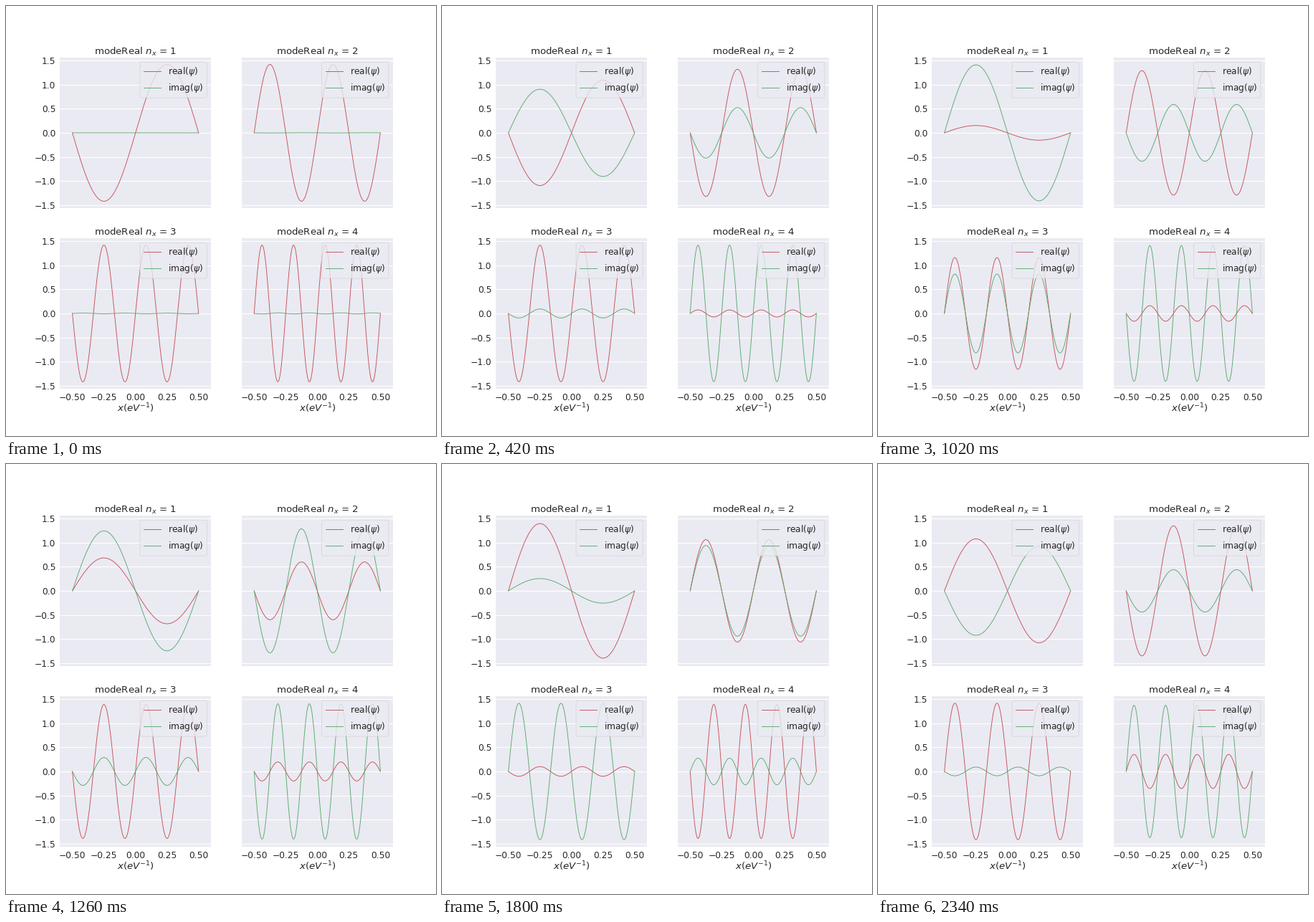
Recreate the animation shown at these times as a matplotlib script. Size 600x600 px, loop 2.37 s.

```python
import matplotlib.pyplot as plt
import numpy as np
from matplotlib.animation import FuncAnimation
from matplotlib.patches import FancyBboxPatch

SIZE, DPI = 600, 80
FRAMES, INTERVAL = 79, 30
CELLS = 200
DX = 1 / CELLS
DT = 0.0025
T0 = 2.5e-5
INK, PANEL, RED, GREEN = "#262626", "#EAEAF2", "#C44E52", "#55A868"
LINE = 0.8

plt.rcParams.update({
    "font.family": "DejaVu Sans",
    "mathtext.fontset": "dejavusans",
    "text.color": INK,
    "xtick.labelcolor": INK,
    "ytick.labelcolor": INK,
    "xtick.labelsize": 11,
    "ytick.labelsize": 11,
})

x = np.linspace(-0.5, 0.5, CELLS + 1)


def mode(n):
    """Standing wave and its energy on the finite-difference grid."""
    k = 2 * np.pi * n
    return np.sqrt(2) * np.sin(k * x), (1 - np.cos(k * DX)) / DX**2


def style(ax, row, col):
    ax.set_facecolor(PANEL)
    ax.set_xlim(-0.6, 0.6)
    ax.set_ylim(-1.1 * np.sqrt(2), 1.1 * np.sqrt(2))
    ax.set_xticks([-0.5, -0.25, 0, 0.25, 0.5])
    ax.set_yticks(np.arange(-1.5, 1.6, 0.5))
    ax.set_axisbelow(True)
    ax.grid(axis="y", color="white", lw=1)
    ax.tick_params(length=0, pad=5, labelbottom=row == 1, labelleft=col == 0)
    for spine in ax.spines.values():
        spine.set_visible(False)


def legend(top, right):
    """Key in the upper right corner, in stage pixels."""
    left = right - 99.3
    overlay.add_patch(FancyBboxPatch(
        (left, top + 6.1), 93.2, 50, boxstyle="round,pad=0,rounding_size=2.4",
        fc=PANEL, ec="0.8", lw=0.6, alpha=0.8))
    for i, (name, color) in enumerate((("real", RED), ("imag", GREEN))):
        y = top + 19 + 23 * i
        overlay.plot([left + 4.9, left + 29.3], [y, y], color=color, lw=LINE)
        overlay.text(left + 39.3, y + 4.3, rf"{name}($\psi$)", size=11,
                     va="baseline")


fig, axes = plt.subplots(2, 2, figsize=(SIZE / DPI, SIZE / DPI), dpi=DPI,
                         facecolor="white")
fig.subplots_adjust(left=0.125, right=0.9, bottom=0.11, top=0.88,
                    wspace=0.2, hspace=0.2)

# Full-stage layer in pixels for titles, axis labels and keys
overlay = fig.add_axes([0, 0, 1, 1], zorder=5)
overlay.set_xlim(0, SIZE)
overlay.set_ylim(SIZE, 0)
overlay.axis("off")

waves = []
for n, ax in enumerate(axes.flat, start=1):
    row, col = divmod(n - 1, 2)
    style(ax, row, col)
    box = ax.get_position()
    top, right = SIZE * (1 - box.y1), SIZE * box.x1
    center = SIZE * (box.x0 + box.x1) / 2

    overlay.text(center, top - 3.7, f"modeReal $n_x$ = {n}", size=12,
                 ha="center", va="baseline")
    if row == 1:
        overlay.text(center + 0.5, 566.5, "$x(eV^{-1})$", size=12,
                     ha="center", va="baseline")
    legend(top, right)

    shape, energy = mode(n)
    real, = ax.plot(x, shape, color=RED, lw=LINE)
    imag, = ax.plot(x, 0 * x, color=GREEN, lw=LINE)
    waves.append((real, imag, shape, energy))


def update(frame):
    t = T0 + DT * frame
    for real, imag, shape, energy in waves:
        psi = shape * np.exp(-1j * energy * t)
        real.set_ydata(psi.real)
        imag.set_ydata(psi.imag)
    return [line for wave in waves for line in wave[:2]]


anim = FuncAnimation(fig, update, frames=FRAMES, interval=INTERVAL,
                     repeat=True, repeat_delay=0, blit=False)
plt.show()
```
